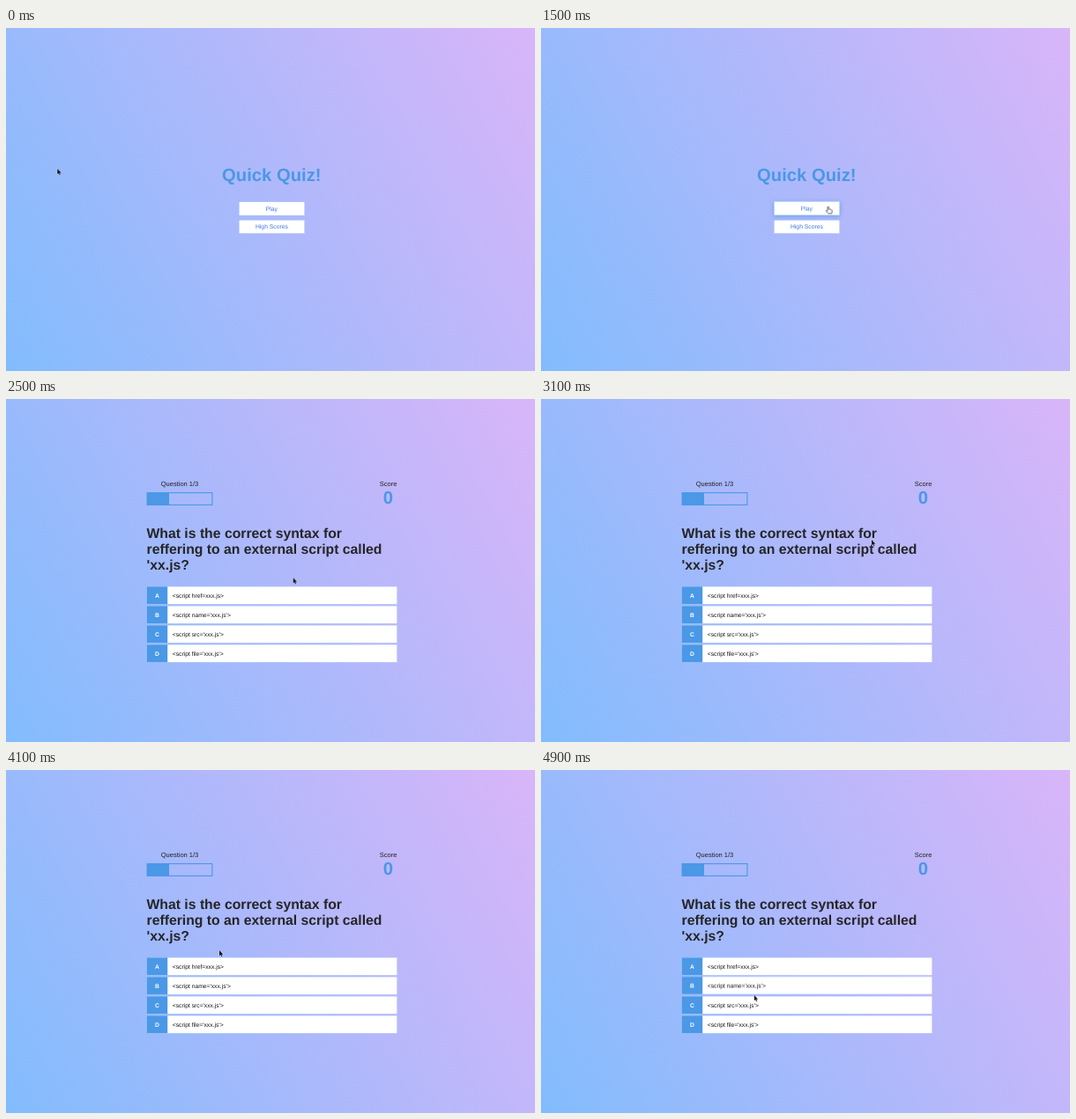
Animation of 600 by 390 pixels, one loop 5 s. Source, as an HTML page:

```html
<!DOCTYPE html>
<html lang="en">
<head>
<meta charset="utf-8">
<title>Quick Quiz</title>
<style>
  html, body { margin: 0; width: 100%; height: 100%; overflow: hidden; }
  svg {
    display: block; width: 600px; height: 390px;
    background: linear-gradient(62deg, #82bcfd, #d9b5f9);
    --blue: #4a98e6;
  }
  text {
    font: 6.75px Arial, "Liberation Sans", sans-serif;
    text-rendering: geometricPrecision; white-space: pre;
  }
  .mid { text-anchor: middle; }
  .title, .score { font-size: 20.25px; font-weight: 700; fill: var(--blue); }
  .button { fill: #fff; stroke: #4a98e6; stroke-opacity: .5; stroke-width: .375; }
  .link { fill: #3f74e0; }
  .label { font-size: 7.5px; fill: #222; }
  .question { font-size: 15.75px; font-weight: 700; fill: #252528; }
  .choice { fill: #fff; stroke: #56a5eb; stroke-opacity: .25; stroke-width: .375; }
  .prefix { fill: var(--blue); }
  .letter { fill: #fff; font-weight: 700; }
  .answer { fill: #151518; }

  .home, .game, .play, .second, .cursor, .arrow, .hand {
    animation: 5s step-end infinite;
  }
  .home { animation-name: home; }
  .game { animation-name: game; }
  .play { animation-name: play; }
  .second { animation-name: second; }
  .cursor { animation-name: move; }
  .arrow { animation-name: arrow; }
  .hand { animation-name: hand; }

  @keyframes home { 0% { visibility: visible } 50%, 100% { visibility: hidden } }
  @keyframes game { 0% { visibility: hidden } 50%, 100% { visibility: visible } }
  @keyframes play {
    0% { filter: none }
    18%, 100% {
      transform: translateY(-.375px);
      filter: drop-shadow(0 1.5px 2.6px rgba(50, 140, 220, .6));
    }
  }
  @keyframes second {
    0%, 98%, 100% { filter: none }
    84% {
      transform: translateY(-.375px);
      filter: drop-shadow(0 1.5px 2.6px rgba(70, 170, 230, .55));
    }
  }
  @keyframes arrow {
    0%, 48%, 98%, 100% { visibility: visible }
    18%, 84% { visibility: hidden }
  }
  @keyframes hand {
    0%, 48%, 98%, 100% { visibility: hidden }
    18%, 84% { visibility: visible }
  }
  @keyframes move {
    0%   { transform: translate(58.3px, 160px) }
    2%   { transform: translate(137px, 167px) }
    6%   { transform: translate(190px, 215px) }
    8%   { transform: translate(255px, 270px) }
    10%  { transform: translate(320px, 315px) }
    12%  { transform: translate(360px, 300px) }
    14%  { transform: translate(355px, 255px) }
    16%  { transform: translate(342px, 220px) }
    18%  { transform: translate(331px, 208px) }
    20%  { transform: translate(327px, 205px) }
    22%  { transform: translate(325.7px, 203.2px) }
    62%  { transform: translate(375px, 160px) }
    64%  { transform: translate(432px, 118px) }
    66%  { transform: translate(330px, 112px) }
    68%  { transform: translate(190px, 108px) }
    70%  { transform: translate(142px, 112px) }
    72%  { transform: translate(246px, 115.5px) }
    76%  { transform: translate(247px, 126px) }
    78%  { transform: translate(246px, 145px) }
    80%  { transform: translate(244px, 175px) }
    82%  { transform: translate(242px, 205px) }
    84%  { transform: translate(241px, 238px) }
    88%  { transform: translate(241.2px, 239.8px) }
    94%  { transform: translate(241.5px, 244px) }
    96%  { transform: translate(241.8px, 250px) }
    98%, 100% { transform: translate(241.8px, 256px) }
  }
</style>
</head>
<body>
<svg viewBox="0 0 600 390">
  <g class="home">
    <text class="title mid" x="301.3" y="174">Quick Quiz!</text>
    <g>
      <rect class="button" x="264.3" y="218.4" width="74.4" height="15.2"/>
      <text class="link mid" x="301.4" y="228.3">High Scores</text>
    </g>
    <g class="play">
      <rect class="button" x="264.3" y="197.6" width="74.4" height="15.6"/>
      <text class="link mid" x="301.4" y="207.6">Play</text>
    </g>
  </g>

  <g class="game">
    <text class="label mid" x="197" y="98.6">Question 1/3</text>
    <rect x="160.1" y="106.6" width="73.8" height="13.8" fill="none" stroke="#4a98e6" stroke-width="1.1"/>
    <rect class="prefix" x="160" y="106.5" width="25" height="14"/>
    <text class="label mid" x="433.6" y="98.6">Score</text>
    <text class="score mid" x="433.5" y="119.2">0</text>

    <g class="question">
      <text class="question" x="159.5" y="157.6">What is the correct syntax for</text>
      <text class="question" x="159.5" y="176">reffering to an external script called</text>
      <text class="question" x="159.5" y="194.4">'xx.js?</text>
    </g>

    <g id="choices"></g>
  </g>

  <g class="cursor">
    <path class="arrow" d="M0 0V6.3L1.4 5L2.4 7.3L3.4 6.9L2.4 4.7H4.3Z" fill="#111" stroke="#fff" stroke-width=".5" stroke-opacity=".8" paint-order="stroke"/>
    <path class="hand" d="M-.8 .3Q0 -.8 .8 .3V2.8L3.7 3.4Q4.6 3.8 4.4 5L3.8 7.8H.2L-2.5 4.8Q-2.3 3.6 -.8 4.6Z" fill="#fff" stroke="#222" stroke-width=".7"/>
  </g>
</svg>
<script>
  const answers = ["href=xxx.js", "name='xxx.js'", "src='xxx.js'", "file='xxx.js'"];
  const row = (answer, i) => {
    const y = 213.3 + i * 22;
    return `<g class="${i === 1 ? "second" : ""}">
      <rect class="choice" x="159.7" y="${y}" width="283.8" height="20"/>
      <rect class="prefix" x="159.7" y="${y}" width="23.5" height="20"/>
      <text class="letter mid" x="171.4" y="${y + 12.3}">${"ABCD"[i]}</text>
      <text class="answer" x="188.7" y="${y + 12.2}">&lt;script ${answer}&gt;</text>
    </g>`;
  };
  document.getElementById("choices").innerHTML = answers.map(row).join("");
</script>
</body>
</html>
```
